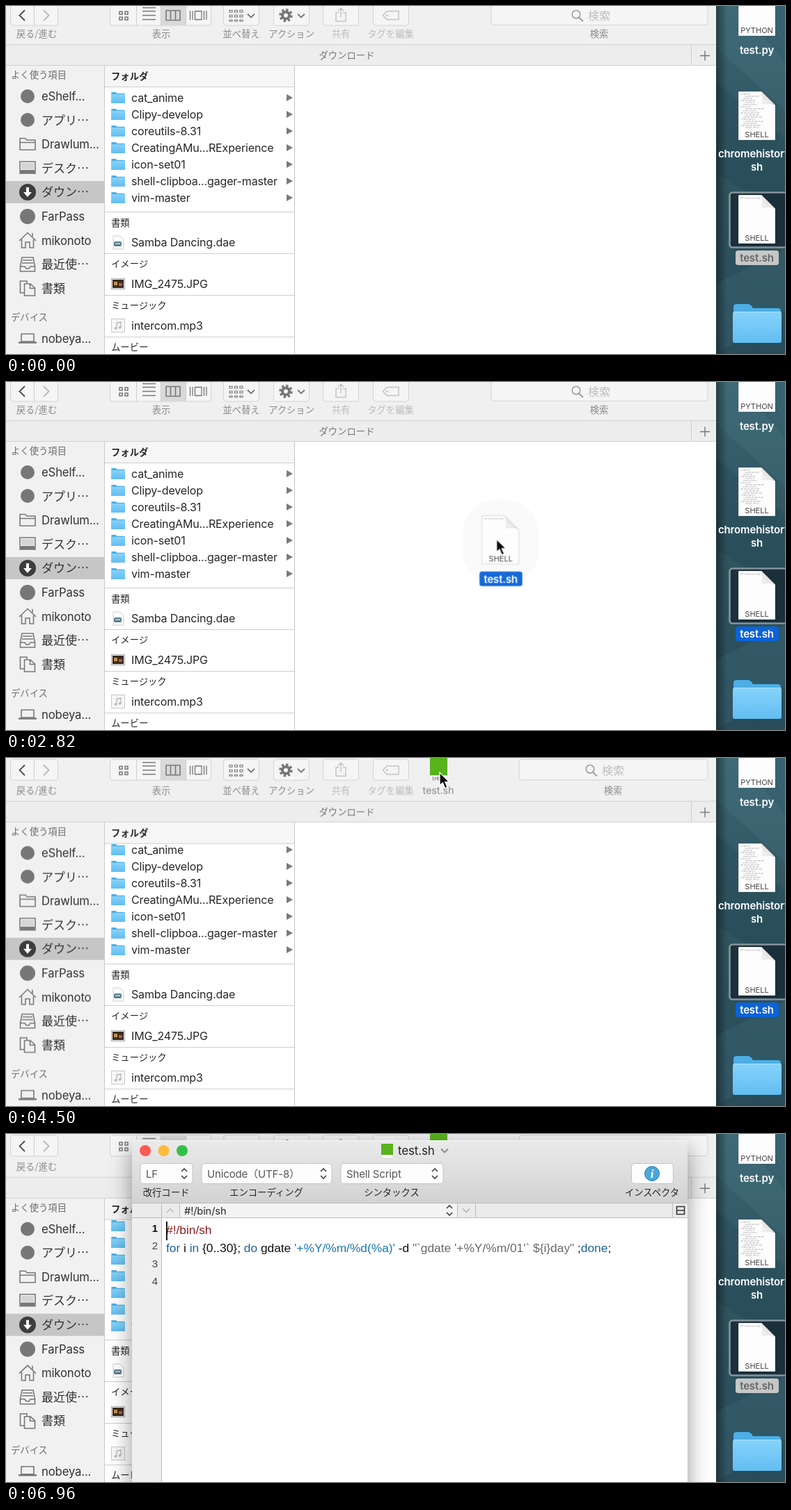
Animation of 1119x501 px, one loop 7020 ms. Source, as an HTML page:

```html
<!DOCTYPE html>
<html lang="ja">
<head>
<meta charset="utf-8">
<title>Drag a script to the toolbar</title>
<style>
html, body { margin: 0; width: 100%; height: 100%; overflow: hidden; background: #fff; }
svg.stage { display: block; width: 100vw; height: 100vh; }
text { font: 16px Inter, "Noto Sans CJK JP", sans-serif; letter-spacing: -.15px; fill: #262626; white-space: pre; }
.j text, text.j { font: 13.33px "Noto Sans CJK JP", Inter, sans-serif; letter-spacing: 0; }
.mid { text-anchor: middle; }
.dim text, text.dim { fill: #8c8c8c; }
.faint text, text.faint { fill: #bdbdbd; }
text.kind { font-size: 11px; fill: #444; letter-spacing: 0; text-anchor: middle; }
text.name { font-weight: 600; font-size: 15px; fill: #fff; }
.side text { font-size: 16.7px; fill: #333; }
.side text.j { font-size: 17px; }
.side text.cap { font-size: 13.33px; fill: #6c6c6c; }
.code text { font: 17.33px "Liberation Sans", Arial, sans-serif; letter-spacing: 0; fill: #111; }
.code .no { font-size: 15px; text-anchor: end; fill: #444; }
.kw { fill: #1d6595; } .str { fill: #1c78ad; } .quo { fill: #66686b; }
.btn { fill: #f5f5f5; stroke: #d3d3d3; }
.pop { fill: #fdfdfd; stroke: #c4c3c4; }
.ln { fill: none; stroke: #787878; stroke-width: 1.6; }
.pale { fill: none; stroke: #c3c3c3; stroke-width: 1.5; }
.rule { stroke: #cfcfcf; }

.an, .cursor, .drag { animation: 7020ms linear infinite; }
.step { animation-timing-function: step-end; }
.cursor { animation-name: point; }
.drag { animation-name: carry, held; animation-timing-function: linear, step-end; }
.badge { animation-name: badge; }
.low { animation-name: low; }
.half { animation-name: half; }
.field { x: 697px; width: 311px; animation-name: field; }
.find { animation-name: find; }
.item { animation-name: item; }
.pill { animation-name: pill; }
.pilltext { animation-name: pilltext; }
.editor { transform-origin: 580px 260px; animation-name: open; filter: drop-shadow(0 12px 16px rgba(0,0,0,.42)); }
.caret { animation-name: blink; }

@keyframes point {
  0%, 4.274% { transform: translate(1130px, 334px); animation-timing-function: ease-out; }
  12.821%, 22.222% { transform: translate(1083px, 309px); }
  40.171% { transform: translate(705px, 227px); }
  44.444% { transform: translate(590px, 30px); }
  46.154% { transform: translate(600px, 19px); }
  52.707%, 69.231% { transform: translate(623px, 21px); }
  71.795%, 100% { transform: translate(630px, -40px); }
}
@keyframes carry {
  0%, 22.222% { transform: translate(1052px, 271px); }
  40.171% { transform: translate(684px, 193px); }
  44.6% { transform: translate(561px, -3px); }
  46.154% { transform: translate(565px, -17px); }
  53.2%, 100% { transform: translate(591px, -16px); }
}
@keyframes held { 0% { opacity: 0; } 22.222% { opacity: .96; } 57.265%, 100% { opacity: 0; } }
@keyframes badge { 0% { opacity: 0; } 43.59% { opacity: 1; } 57.265%, 100% { opacity: 0; } }
@keyframes low { 0% { transform: none; } 57.265%, 100% { transform: translateY(6.7px); } }
@keyframes half { 0% { transform: none; } 57.265%, 100% { transform: translateY(4px); } }
@keyframes field { 0% { x: 697px; width: 311px; } 57.265%, 100% { x: 737px; width: 271px; } }
@keyframes find { 0% { transform: none; } 57.265%, 100% { transform: translateX(20px); } }
@keyframes item { 0% { opacity: 0; } 57.265%, 100% { opacity: 1; } }
@keyframes pill { 0% { fill: #c6c7c7; } 15.385% { fill: #0b63d8; } 66.667%, 100% { fill: #c6c7c7; } }
@keyframes pilltext { 0% { fill: #666; } 15.385% { fill: #fff; } 66.667%, 100% { fill: #666; } }
@keyframes open {
  0%, 70.085% { opacity: 0; transform: scale(.88); }
  71.795%, 100% { opacity: 1; transform: none; }
}
@keyframes blink { 0% { opacity: 1; } 76.353% { opacity: 0; } 84.33% { opacity: 1; } 88.319% { opacity: 0; } 92.308%, 100% { opacity: 1; } }
</style>
</head>
<body>
<svg class="stage" viewBox="0 0 1119 501" preserveAspectRatio="none">
<defs>
  <linearGradient id="sea" x2="0" y2="1"><stop stop-color="#386370"/><stop offset=".5" stop-color="#30545f"/><stop offset="1" stop-color="#294c5a"/></linearGradient>
  <linearGradient id="edge"><stop stop-color="#000" stop-opacity=".4"/><stop offset="1" stop-color="#000" stop-opacity="0"/></linearGradient>
  <linearGradient id="sky" x2="0" y2="1"><stop stop-color="#85d3fb"/><stop offset="1" stop-color="#62bdf1"/></linearGradient>
  <linearGradient id="metal" x2="0" y2="1"><stop stop-color="#ebeaeb"/><stop offset="1" stop-color="#d3d2d3"/></linearGradient>
  <linearGradient id="fold" x1="0" y1="1" x2="1" y2="0"><stop stop-color="#fff"/><stop offset=".5" stop-color="#e2e2e2"/><stop offset="1" stop-color="#fafafa"/></linearGradient>
  <symbol id="folder" viewBox="0 0 70 56">
    <path d="M1 4q0-4 4-4h17q3 0 5 3l2 3h36q4 0 4 4v10H1z" fill="#4daee6"/>
    <rect y="11" width="70" height="45" rx="3" fill="url(#sky)"/>
    <path d="M1 11.5H69" stroke="#a9e1fd"/>
  </symbol>
  <g id="page">
    <path d="M0 0H33L53 20V70H0z" fill="#fdfdfd" stroke="#000" stroke-opacity=".14"/>
    <path d="M33 0Q37 8 35 18Q45 15 53 20z" fill="url(#fold)" stroke="#d0d0d0" stroke-width=".6"/>
  </g>
  <path id="head" d="M3 4.5H31" stroke="#bbb" stroke-width="1.2" stroke-dasharray="4 1 2 1 6 1"/>
  <path id="updown" d="M-4-3L0-7 4-3M-4 3L0 7 4 3" fill="none" stroke="#444" stroke-width="1.7"/>
  <path id="down" d="M-5-2.5L0 2.5 5-2.5" fill="none" stroke-width="1.8"/>
</defs>

<!-- desktop -->
<rect x="1020" width="99" height="501" fill="url(#sea)"/>
<path d="M1020 0H1050L1119 80V150L1020 60z" fill="#5c8c95" opacity=".16"/>
<path d="M1020 110L1119 190V300L1020 240z" fill="#173b48" opacity=".2"/>
<path d="M1020 400L1119 350V440L1020 501z" fill="#4d8290" opacity=".17"/>
<rect x="1020" width="16" height="501" fill="url(#edge)"/>
<use href="#page" x="1052" y="-27"/>
<text class="kind" x="1078.5" y="39">PYTHON</text>
<text class="name mid" x="1078.5" y="69">test.py</text>
<use href="#page" x="1052" y="123"/>
<g id="listing" stroke="#aaa" stroke-width=".9"></g>
<text class="kind" x="1078.5" y="189">SHELL</text>
<text class="name" x="1023" y="218">chromehistory.</text>
<text class="name mid" x="1078.5" y="237">sh</text>
<rect x="1039.5" y="268.5" width="82" height="79" rx="4" fill="#12212c" fill-opacity=".68" stroke="#87939a" stroke-width="2.6"/>
<use href="#page" x="1052" y="272"/><use href="#head" x="1052" y="272"/>
<text class="kind" x="1078.5" y="338">SHELL</text>
<rect class="an step pill" x="1048" y="352" width="62" height="21" rx="3.5"/>
<text class="name mid an step pilltext" x="1078.5" y="368">test.sh</text>
<use href="#folder" x="1044" y="429" width="70" height="56"/>

<!-- file browser -->
<rect width="1020" height="501" fill="#fff"/>
<g id="files"></g>
<g class="j">
  <text x="151" y="317">書類</text><text x="151" y="376">イメージ</text>
  <text x="151" y="436">ミュージック</text><text x="151" y="496">ムービー</text>
</g>
<path class="rule" d="M142 296.5H414M142 356.5H414M142 416.5H414M142 476.5H414"/>
<path d="M154 331H164L169 336V350H154z" fill="#fff" stroke="#ccc"/>
<rect x="155" y="339" width="11" height="7" rx="2" fill="#5b7d8c"/><path d="M157 342h7" stroke="#d7e5ea" stroke-width="1.4"/>
<rect x="151.5" y="392.5" width="19" height="15" fill="#eee" stroke="#aaa"/><rect x="153" y="394" width="16" height="12" fill="#3b2a20"/>
<rect x="155" y="397" width="5" height="5" fill="#c98d4b"/><rect x="162" y="399" width="5" height="4" fill="#a8613c"/>
<rect x="151.5" y="450.5" width="19" height="19" fill="#f6f6f6" stroke="#c9c9c9"/>
<path d="M159 464V456L165 455V463" fill="none" stroke="#b5b5b5" stroke-width="1.3"/><circle cx="157.5" cy="464" r="1.8" fill="#b5b5b5"/><circle cx="163.5" cy="463" r="1.8" fill="#b5b5b5"/>
<text x="180" y="346">Samba Dancing.dae</text>
<text x="180" y="406">IMG_2475.JPG</text>
<text x="180" y="466">intercom.mp3</text>
<path d="M414.5 86V501" stroke="#c4c4c4"/>

<rect y="80" width="142" height="421" fill="#f1f1f1"/>
<path d="M141.5 86V501" stroke="#c9c9c9"/>
<g class="an step low">
  <rect x="142" y="80" width="272" height="36" fill="#f6f6f6"/><path class="rule" d="M142 116.5H414"/>
  <text class="j" x="151" y="106" style="font-weight:700">フォルダ</text>
  <rect y="252" width="141" height="32" fill="#c6c6c6"/>
  <g class="side">
    <text class="j cap" x="7" y="104">よく使う項目</text>
    <text class="j cap" x="7" y="453">デバイス</text>
    <g id="places"></g>
    <g fill="#777">
      <circle cx="31" cy="130" r="10"/><circle cx="31" cy="164" r="10"/><circle cx="31" cy="303" r="11"/>
    </g>
    <path class="ln" d="M20 207V190.5H28L30 193H42V207zM20 196.500H42"/>
    <path class="ln" d="M20 224H42V241H20z"/><path d="M21 236H41V241H21z" fill="#777"/><path d="M22 226H40V235H22z" fill="#d5d5d5"/>
    <circle cx="31" cy="268" r="12" fill="#3d3d3d"/>
    <path d="M29 261H33V268H37L31 275 25 268H29z" fill="#fff"/>
    <path class="ln" d="M19 338L31 326.500 43 338M22.500 336V348H28V340H34V348H39.500V336M38 332V327"/>
    <path class="ln" d="M23 362H39L41.500 375V382H20.500V375zM24 366H38M23 370H39M21 375H27L29 378H33L35 375H41"/>
    <path class="ln" d="M26 413H20.500V396H30V399M26.500 400H35L41.500 406V417H26.500zM34.500 400V406.500H41"/>
    <path class="ln" d="M22 472H40V483H22z"/><path d="M18 484.500H44" stroke="#777" stroke-width="2.500"/>
  </g>
  <rect y="-20" width="1020" height="106" fill="#f1f0f1"/>
  <rect y="56" width="1020" height="30" fill="#ededed"/>
  <path class="rule" d="M0 55.500H1020M0 85.500H1020M984.500 56V86"/>
  <path d="M997 71.500H1011M1004 64.500V78.500" stroke="#777" stroke-width="1.4"/>
  <text class="j mid" x="489.500" y="75.500" style="fill:#777">ダウンロード</text>
  <g class="j dim mid">
    <text x="44" y="45">戻る/進む</text><text x="223" y="45">表示</text><text x="338" y="45">並べ替え</text><text x="410" y="45">アクション</text>
    <text class="an step find" x="852" y="45">検索</text>
  </g>
  <g class="j faint mid"><text x="481" y="45">共有</text><text x="552.500" y="45">タグを編集</text></g>
  <text class="dim mid an step item" x="621" y="45" style="font-size:14.500px">test.sh</text>
</g>
<g class="an step half">
  <rect class="btn" x="6.500" y="-2" width="68" height="30" rx="4"/>
  <rect class="btn" x="149.500" y="-2" width="145" height="30" rx="4"/>
  <rect x="222" y="-2" width="36" height="30" fill="#d9d9d9"/>
  <path class="rule" d="M40.500-2V28M187.500-2V28M222.500-2V28M258.500-2V28"/>
  <rect class="btn" x="312.500" y="-2" width="51" height="30" rx="4"/><rect class="btn" x="384.500" y="-2" width="51" height="30" rx="4"/>
  <rect class="btn" x="455.500" y="-2" width="51" height="30" rx="4"/><rect class="btn" x="527.500" y="-2" width="51" height="30" rx="4"/>
  <path d="M27 6L19.500 13.500 27 21" fill="none" stroke="#555" stroke-width="2"/>
  <path d="M54 6L61.500 13.500 54 21" fill="none" stroke="#bbb" stroke-width="2"/>
  <g class="ln">
    <path d="M163 8h4v4h-4zM171 8h4v4h-4zM163 16h4v4h-4zM171 16h4v4h-4z"/>
    <path d="M196 7.500H215M196 13.500H215M196 19.500H215M196 2.500H215" stroke-width="1.3"/>
    <path d="M230 6.500H250V20.500H230zM236.500 6V21M243.500 6V21"/>
    <path d="M264.500 7V20M268 7V20M271.500 7.500H281V19.500H271.500zM284.500 7V20M288 7V20" stroke-width="1.3"/>
    <path d="M321 6h4v3h-4zM328.500 6h4v3h-4zM336 6h4v3h-4zM321 13h4v3h-4zM328.500 13h4v3h-4zM336 13h4v3h-4zM321 20h4v2h-4zM328.500 20h4v2h-4zM336 20h4v2h-4z" stroke-width="1.2"/>
  </g>
  <use href="#down" x="352" y="14" stroke="#777"/><use href="#down" x="424" y="14" stroke="#777"/>
  <circle cx="402" cy="13.500" r="8" fill="none" stroke="#777" stroke-width="3.500" stroke-dasharray="3.200 3.083"/>
  <circle cx="402" cy="13.500" r="5" fill="none" stroke="#777" stroke-width="4"/>
  <path class="pale" d="M478 9.500H474V22H488V9.500H484M481 16V3.500M477 7L481 3 485 7"/>
  <path class="pale" d="M541.500 13.500L547 7.500H564V19.500H547z"/><circle cx="547.500" cy="13.500" r="1.400" fill="#c3c3c3"/>
  <rect class="btn an step field" y="-2" height="29.500" rx="4"/>
  <g class="an step find">
    <circle cx="819" cy="12" r="5.800" fill="none" stroke="#999" stroke-width="1.500"/><path d="M823 16.500L829 22" stroke="#999" stroke-width="1.700"/>
    <text class="j faint" x="836" y="19.500" style="font-size:16px">検索</text>
  </g>
</g>
<g class="an step item">
  <path d="M609 0H633V33H609z" fill="#fbfbfb" stroke="#ddd" stroke-width=".6"/>
  <rect x="609" y="0" width="25" height="25" fill="#58b31d"/>
  <text class="kind" x="621" y="31.500" style="font-size:6px">SHELL</text>
</g>

<!-- editor -->
<g class="an editor">
  <path d="M181 520V15Q181 9 187 9H973Q979 9 979 15V520z" fill="#fff"/>
  <path d="M181 100V15Q181 9 187 9H973Q979 9 979 15V100z" fill="url(#metal)"/>
  <path d="M183 10.500Q184 9.500 187 9.500H973Q976 9.500 977 10.500" fill="none" stroke="#f8f8f8"/>
  <circle cx="200" cy="24" r="8" fill="#fc5b57"/><circle cx="226.500" cy="24" r="8" fill="#fdbb3c"/><circle cx="253" cy="24" r="8" fill="#32c146"/>
  <rect x="540" y="14" width="15" height="20" fill="#fcfcfc"/><rect x="539" y="14" width="17" height="16" fill="#58b31d"/>
  <text x="563" y="30" style="font-size:17px">test.sh</text><use href="#down" x="630" y="24" stroke="#888"/>
  <rect class="pop" x="193" y="42.500" width="75" height="29" rx="4.500"/><rect class="pop" x="281" y="42.500" width="187" height="29" rx="4.500"/>
  <rect class="pop" x="481" y="42.500" width="147" height="29" rx="4.500"/><rect class="pop" x="898.500" y="42.500" width="60" height="29" rx="4.500"/>
  <use href="#updown" x="256" y="57"/><use href="#updown" x="456" y="57"/><use href="#updown" x="616" y="57"/>
  <g style="font-size:15px">
    <text x="201" y="63" style="font-size:15px;fill:#555">LF</text>
    <text x="289" y="63" style="font-size:15px;fill:#555">Unicode（UTF-8）</text>
    <text x="489" y="63" style="font-size:15px;fill:#555">Shell Script</text>
  </g>
  <circle cx="928" cy="57" r="10.500" fill="#4aa6da" stroke="#2d7fb5"/>
  <text class="mid" x="928" y="63" style="font:italic 700 17px 'Liberation Serif',serif;fill:#fff">i</text>
  <g class="j mid">
    <text x="230" y="89">改行コード</text><text x="374" y="89">エンコーディング</text><text x="554" y="89">シンタックス</text><text x="928" y="89">インスペクタ</text>
  </g>
  <rect x="181" y="99" width="798" height="22" fill="#ebebeb"/><rect x="249" y="100" width="400" height="20" fill="#f4f4f4"/>
  <rect x="181" y="121" width="42" height="390" fill="#efefef"/>
  <path d="M181 99.500H979M181 120.500H979M223.500 100V501M249.500 100V120M648.500 100V120M674.500 100V120M957.500 100V120" stroke="#bbb"/>
  <path d="M231 113L236 108 241 113" fill="none" stroke="#bbb" stroke-width="1.600"/><use href="#down" x="661" y="110" stroke="#bbb"/>
  <text x="256" y="116" style="font-size:14.700px">#!/bin/sh</text>
  <use href="#updown" x="637" y="110"/>
  <path d="M963.500 104.500H974.500V115.500H963.500zM963 110H975" fill="none" stroke="#333" stroke-width="1.600"/>
  <g class="code">
    <text class="no" x="218" y="141" style="font-weight:700;fill:#111">1</text><text class="no" x="218" y="166">2</text><text class="no" x="218" y="192">3</text><text class="no" x="218" y="217">4</text>
    <text x="230" y="144" style="fill:#8b1d1c">#!/bin/sh</text>
    <text x="230" y="170"><tspan class="kw">for</tspan> i <tspan class="kw">in</tspan> {0..30}; <tspan class="kw">do</tspan> gdate <tspan class="str">'+%Y/%m/%d(%a)'</tspan> -d <tspan class="quo">"`gdate '+%Y/%m/01'` ${i}day"</tspan> ;<tspan class="kw">done</tspan>;</text>
  </g>
  <rect class="an step caret" x="230" y="126" width="1.800" height="27"/>
</g>

<!-- dragged file and pointer -->
<g class="drag">
  <rect x="-28" y="-23" width="110" height="122" rx="48" opacity=".022"/>
  <use href="#page"/><use href="#head"/>
  <text class="kind" x="27" y="66">SHELL</text>
  <rect x="-3.500" y="80.500" width="61.500" height="21" rx="3.500" fill="#0b63d8"/>
  <text class="name mid" x="27" y="96.500">test.sh</text>
</g>
<g class="cursor">
  <g class="an step badge">
    <circle cx="13" cy="31" r="11.500" fill="#3ba928" stroke="#258017"/>
    <path d="M6.500 31H19.500M13 24.500V37.500" stroke="#fff" stroke-width="3.200"/>
  </g>
  <path d="M0 0V18.500L4.300 14.600 7.500 22.500 11 21 7.700 13.300H13.500z" fill="#0a0a0a" stroke="#fff" stroke-width="1.300"/>
</g>
</svg>
<script>
const put = (id, html) => document.getElementById(id).innerHTML = html;

const folders = ["cat_anime", "Clipy-develop", "coreutils-8.31", "CreatingAMu...RExperience",
  "icon-set01", "shell-clipboa...gager-master", "vim-master"];
put("files", folders.map((name, i) => {
  const y = 132 + 24 * i;
  return `<use href="#folder" x="151" y="${y - 8}" width="20" height="16"/>
    <text x="180" y="${y + 6}">${name}</text>
    <path d="M403 ${y - 5}L412 ${y}L403 ${y + 5}z" fill="#7b7b7b"/>`;
}).join(""));

const places = ["eShelf...", "アプリ…", "Drawlum...", "デスク…", "ダウン…", "FarPass", "mikonoto", "最近使…", "書類"];
const place = (name, y) => `<text class="${name.charCodeAt(0) > 255 ? "j" : ""}" x="51" y="${y}">${name}</text>`;
put("places", places.map((name, i) => place(name, 136 + 34.6 * i)).join("") + place("nobeya...", 485));

// tiny lines of script on the page icon
let lines = "";
for (let i = 0; i < 17; i++) {
  const x = 1056 + (i * 5 % 3) * 3, y = 127 + i * 3, len = 13 + (i * 7) % 14 + (i > 6 ? 7 : 0);
  lines += `<path d="M${x} ${y}h${len}" stroke-dasharray="${2 + i % 4} 1 4 1"/>`;
}
put("listing", lines);
</script>
</body>
</html>
```
